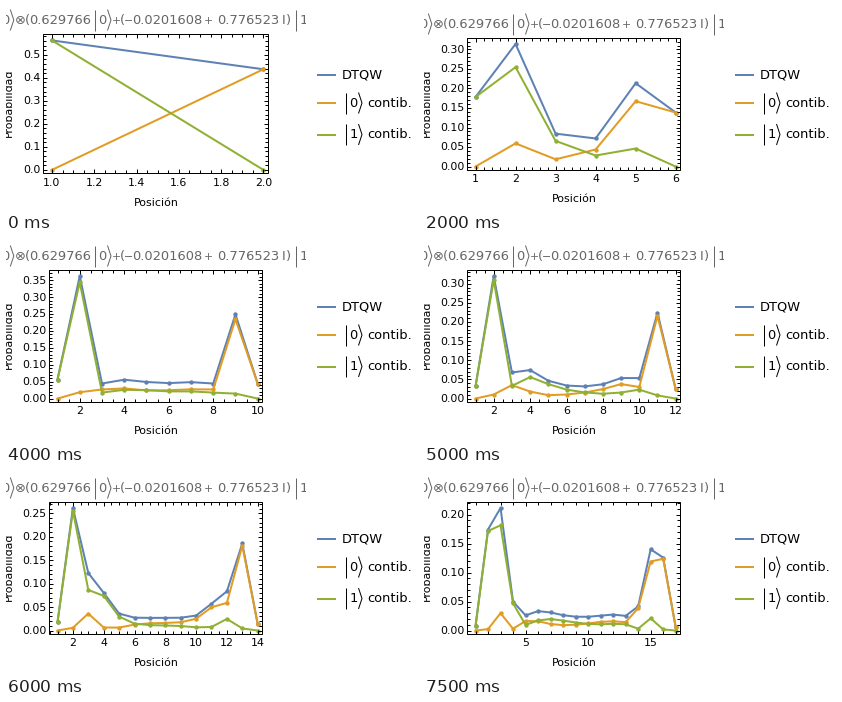
These frames come from a looping animation (412x204 px, 8 s). A matplotlib script:

```python
import math

import matplotlib.pyplot as plt
import numpy as np
from matplotlib.animation import FuncAnimation
from matplotlib.patches import Rectangle

W, H, DPI = 412, 204, 100
BLUE, ORANGE, GREEN = "#5e81b5", "#e19c24", "#8fb032"
GREY = "#666666"
COIN = np.array([[math.sqrt(3), 1], [1, -math.sqrt(3)]]) / 2
START = np.array([0.629766, -0.0201608 + 0.776523j])

plt.rcParams["font.family"] = "DejaVu Sans"
fig = plt.figure(figsize=(W / DPI, H / DPI), dpi=DPI, facecolor="white")
ax = fig.add_axes([0, 0, 1, 1])


def pt(px):
    return px * 72 / DPI


def walk(steps):
    """Probabilities of both coin states after a number of steps."""
    state = START.reshape(2, 1)
    for _ in range(steps):
        up, down = COIN @ state
        state = np.array([np.append(0, up), np.append(down, 0)])
    return np.abs(state) ** 2


def nice_step(span):
    """Major step, minor step and number of decimals for an axis."""
    for e in range(-3, 3):
        for m in (1, 2, 5):
            step = m * 10.0 ** e
            if span / step <= 8.2:
                return step, step / (4 if m == 2 else 5), max(0, -e)


def multiples(lo, hi, step):
    return np.arange(math.ceil(lo / step), math.floor(hi / step) + 1) * step


def label(x, y, s, size=11, color="black", ha="left", **kw):
    ax.text(x, y, s, fontsize=pt(size), color=color, ha=ha, va="baseline", **kw)


def stroke(xs, ys, color, width):
    ax.plot(xs, ys, color=color, lw=pt(width), solid_joinstyle="round",
            solid_capstyle="butt")


def ket(x, base, digit, color):
    stroke([x, x], [base - 14.5, base + 6.5], color, 1)
    label(x + 3, base, digit, 13, color)
    stroke([x + 12, x + 15.5, x + 12],
           [base - 14.5, base - 4, base + 6.5], color, 1)


def draw_title(base):
    ket(-7.7, base, "0", GREY)
    ket(89.5, base, "0", GREY)
    ket(290.5, base, "1", GREY)
    runs = [(8.5, "⊗"), (19, "("), (23.2, "0.629766"), (114, "("),
            (126, "0.0201608"), (211.5, "0.776523"), (275.6, "I"), (280, ")")]
    for x, s in runs:
        label(x, base, s, 13, GREY)
    for x, s in ((105.5, "+"), (118, "−"), (198, "+")):
        label(x, base, s, 11, GREY)
    ax.add_patch(Rectangle((300, 0), 10, 32, color="white", lw=0, zorder=5))


def draw_legend(dy):
    for y, color in ((69, BLUE), (97, ORANGE), (129, GREEN)):
        stroke([311, 330], [y + dy, y + dy], color, 2)
    label(336, 73 + dy, "DTQW", 13)
    for base, digit in ((101, "0"), (132.5, "1")):
        ket(340.5, base + dy, digit, "black")
        label(361, base + dy, "contib.", 13)


def draw(k):
    ax.clear()
    ax.set(xlim=(0, W), ylim=(H, 0))
    ax.axis("off")

    zero, one = walk(k + 1)
    total = zero + one
    n, peak = len(total), total.max()
    pos = np.arange(1, n + 1)

    # data ranges with the padding of the frame
    x0, x1 = 1 - 0.04 * (n - 1), n + 0.024 * (n - 1)
    y0, y1 = -0.024 * peak, 1.05 * peak
    xs, xminor, xdec = nice_step(x1 - x0)
    ys, yminor, ydec = nice_step(y1 - y0)

    # short tick labels leave room for a bigger frame
    big = ydec == 1
    left, right = (37.5, 262.5) if big else (43.5, 256.5)
    height = (right - left) * 2 / (1 + math.sqrt(5))
    xmajor, ymajor = multiples(x0, x1, xs), multiples(y0, y1, ys)

    # a tick label close to the top edge pushes the title up
    gap = (y1 - ymajor[-1]) / (y1 - y0) * height
    over = max(0, 5.4 - gap)
    extra = round(over)
    shift = extra // 2
    bottom = (167 if big else 163.5) + shift
    top = bottom - height

    def px(x):
        return left + (np.asarray(x) - x0) / (x1 - x0) * (right - left)

    def py(y):
        return bottom - (np.asarray(y) - y0) / (y1 - y0) * height

    for p, color in ((total, BLUE), (zero, ORANGE), (one, GREEN)):
        ax.plot(px(pos), py(p), color=color, lw=pt(2), marker="o",
                ms=pt(4.4), mew=0, solid_joinstyle="round")

    ax.add_patch(Rectangle((left, top), right - left, height, fill=False,
                           ec="black", lw=pt(1)))
    for xt, yt, size in ((multiples(x0, x1, xminor), multiples(y0, y1, yminor), 3),
                         (xmajor, ymajor, 4)):
        tick = dict(colors="black", linewidths=pt(1))
        ax.vlines(px(xt), bottom - size, bottom, **tick)
        ax.vlines(px(xt), top, top + size, **tick)
        ax.hlines(py(yt), left, left + size, **tick)
        ax.hlines(py(yt), right - size, right, **tick)

    for v in xmajor:
        label(px(v), round(bottom + 12.6), f"{v:.{xdec}f}", ha="center")
    for v in ymajor:
        label(left - 2.8, py(v) + 3.4, f"{v:.{ydec}f}", ha="right")

    label(150, (200 if big else 196) + shift, "Posición", ha="center")
    ax.text(6, (top + bottom) / 2 - 0.5, "Probabilidad", fontsize=pt(11),
            rotation=90, rotation_mode="anchor", ha="center", va="baseline")
    draw_title((18 if big else 22) + shift - over)
    draw_legend(-(extra % 2) / 2)
    return []


anim = FuncAnimation(fig, draw, frames=16, interval=500, repeat=True,
                     repeat_delay=0, init_func=lambda: [])
plt.show()
```
